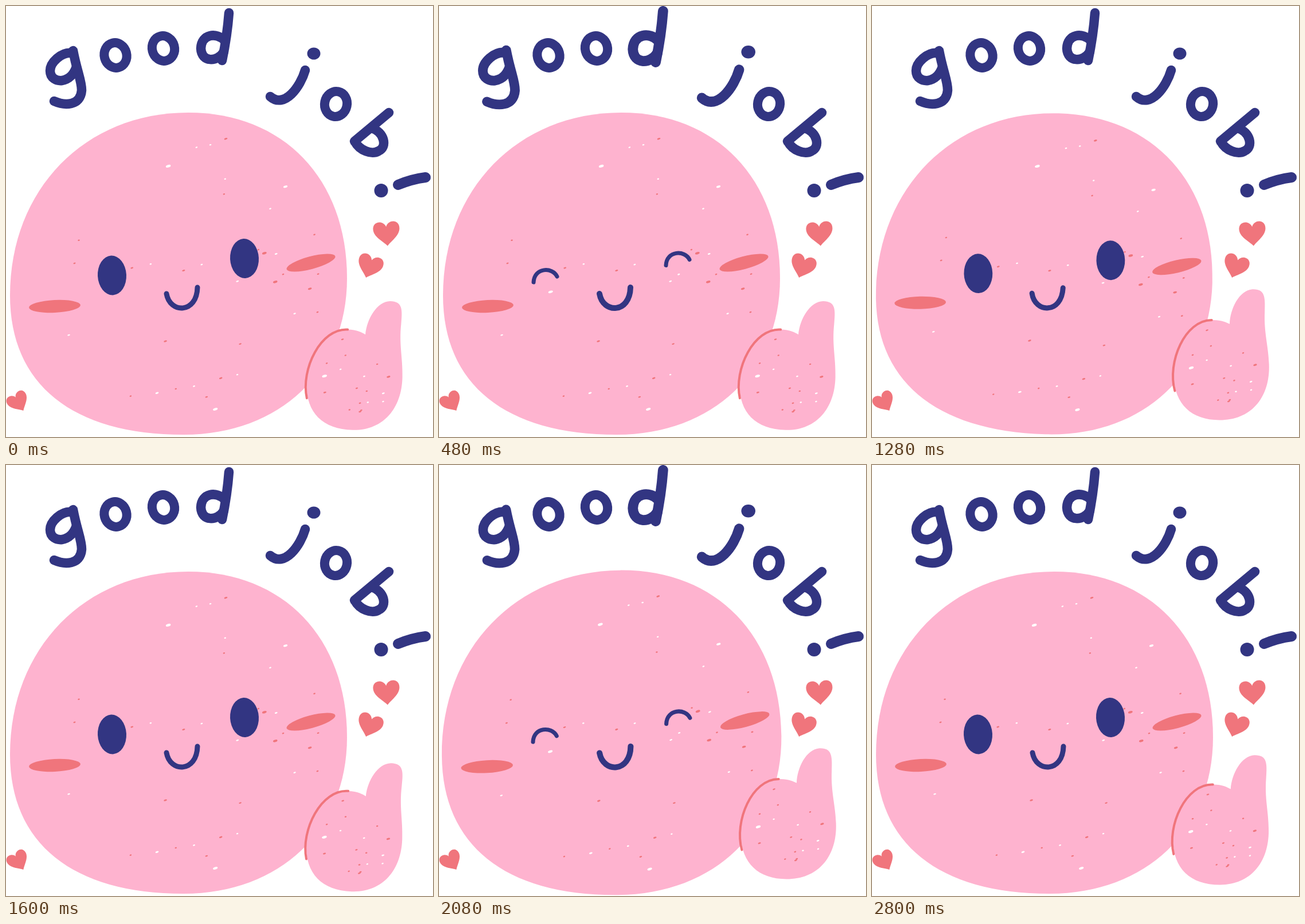
Write an HTML page with a canvas that moves like this. It is 745 px wide and 752 px high and loops after 2880 ms.

```html
<!DOCTYPE html>
<html lang="en">
<head>
<meta charset="utf-8">
<title>good job!</title>
<style>
html, body { margin: 0; width: 100%; height: 100%; overflow: hidden; background: #fff; }
canvas { display: block; }
</style>
</head>
<body>
<canvas id="stage" width="745" height="752"></canvas>
<script>
const ctx = document.getElementById('stage').getContext('2d');
const PINK = '#feb3cf', NAVY = '#323582', CORAL = '#f0757c', WHITE = '#fff';
const STEP = 80, STEPS = 36, HALF = 18;
const TAU = Math.PI * 2;

// Smooth hump: 1 at the peak, 0 from the given reach outwards.
const hump = (t, peak, reach) =>
  Math.abs(t - peak) < reach ? Math.cos((t - peak) / reach * Math.PI / 2) ** 2 : 0;

function fill(path, color) {
  ctx.fillStyle = color;
  ctx.fill(new Path2D(path));
}

function brush(path, color, width) {
  ctx.strokeStyle = color;
  ctx.lineWidth = width;
  ctx.stroke(new Path2D(path));
}

function oval(x, y, rx, ry, angle, color) {
  ctx.beginPath();
  ctx.ellipse(x, y, rx, ry, angle, 0, TAU);
  ctx.fillStyle = color;
  ctx.fill();
}

function around(x, y, angle, scale, draw) {
  ctx.save();
  ctx.translate(x, y);
  ctx.rotate(angle);
  ctx.scale(scale, scale);
  ctx.translate(-x, -y);
  draw();
  ctx.restore();
}

function seeded(seed) {
  return () => (seed = seed * 16807 % 2147483647) / 2147483647;
}

function specks(seed, count, color, x, y, rx, ry) {
  const random = seeded(seed);
  for (let i = 0; i < count; i++) {
    const angle = random() * TAU, reach = Math.sqrt(random()), size = 1.8 + 3 * random() ** 3;
    oval(x + rx * reach * Math.cos(angle), y + ry * reach * Math.sin(angle),
      size, Math.max(1.2, size / 2), -.3, color);
  }
}

function heart(x, y, size, angle) {
  ctx.save();
  ctx.translate(x, y);
  ctx.rotate(angle);
  ctx.scale(size, size);
  ctx.beginPath();
  for (const side of [-1, 1]) {
    ctx.moveTo(0, -.45);
    ctx.bezierCurveTo(side * .2, -1, side * 1.05, -.95, side, -.25);
    ctx.bezierCurveTo(side * .95, .3, side * .3, .65, 0, 1);
  }
  ctx.fillStyle = CORAL;
  ctx.fill();
  ctx.restore();
}

const ink = path => brush(path, NAVY, 16.5);

function letterO(x, y, angle) {
  ctx.beginPath();
  ctx.ellipse(x, y, 19.5, 22, angle, 0, TAU);
  ctx.strokeStyle = NAVY;
  ctx.lineWidth = 16;
  ctx.stroke();
}

function lettering(phase) {
  const swell = (peak, amount) => 1 + amount * hump(phase, peak, 3);
  around(105, 124, 0, swell(6, .02), () => {
    ink('M115,82 C96,80 77,99 77,113 C77,126 88,131 98,130 C113,127 119,117 123,106');
    ink('M117,78 C124,115 132,130 132,147 C130,175 102,174 84,166');
  });
  letterO(191, 86, -.25);
  letterO(274.5, 74, -.25);
  around(364, 54, 0, swell(7, .1), () => {
    ink('M381,60 C368,46 341,48 340,74 C341,99 369,98 380,80');
    ink('M389,12 Q386,52 377,95');
  });
  around(497, 124, 0, swell(7, .09), () => {
    ink('M522,112 C514,140 486,180 461,158');
    oval(537, 83, 11.5, 10.5, 0, NAVY);
  });
  letterO(575.5, 171, .2);
  ink('M668,186 L608,236');
  ink('M638,213 C660,220 666,246 650,253 C638,260 617,252 609,237');
  around(697, 310, 0, swell(11, .08), () => {
    brush('M684,312 Q708,302 732,299', NAVY, 18);
    oval(654.5, 322, 12, 12, 0, NAVY);
  });
}

// Four extreme points joined by quarter curves, each with its own fullness.
function faceShape() {
  const [top, right, bottom, left] = [[318, 186], [595, 475], [310, 748], [7, 505]];
  const quarter = (from, to, corner, full) => {
    const toward = p => p.map((v, i) => v + (corner[i] - v) * full);
    ctx.bezierCurveTo(...toward(from), ...toward(to), ...to);
  };
  ctx.beginPath();
  ctx.moveTo(...top);
  quarter(top, right, [right[0], top[1]], .6);
  quarter(right, bottom, [right[0], bottom[1]], .59);
  quarter(bottom, left, [left[0], bottom[1]], .64);
  quarter(left, top, [left[0], top[1]], .58);
  ctx.fillStyle = PINK;
  ctx.fill();
}

function face(smiling) {
  faceShape();
  specks(11, 20, CORAL, 303, 468, 270, 255);
  specks(47, 19, WHITE, 303, 468, 270, 255);
  oval(85, 524, 45, 11, -.05, CORAL);
  oval(532, 448, 44, 11, -.26, CORAL);
  for (const [x, y] of [[185, 470], [416, 440.5]]) {
    if (smiling) brush(`M${x - 20},${y + 12} c1,-26 33,-27 41,-10`, NAVY, 7);
    else oval(x, y, 25, 34.5, -.05, NAVY);
  }
  brush('M280,502 C286,537 333,537 334,491', NAVY, smiling ? 10 : 9);
}

function hand() {
  fill(`M595,559 C612,559 620,564 626,567 C628,540 645,509 668,508 C690,508 690,522 688,548
    C685,585 692,605 692,640 C692,695 660,734 607,734 C555,734 525,705 525,655
    C525,610 552,559 595,559 Z`, PINK);
  specks(5, 12, CORAL, 615, 640, 65, 75);
  specks(23, 6, WHITE, 615, 640, 65, 75);
  brush('M595,559 C548,557 514,630 526,680', CORAL, 4);
}

function render(k) {
  const phase = k % HALF;
  const turn = hump(k, 16, 4), bounce = hump(k, 26, 5);
  ctx.fillStyle = WHITE;
  ctx.fillRect(0, 0, 745, 752);
  ctx.lineCap = ctx.lineJoin = 'round';

  lettering(phase);
  around(303, 468, .028 * turn - .008 * bounce, 1 - .003 * turn + .008 * bounce,
    () => face(phase >= 4 && phase <= 8));
  heart(664, 395.5, 23, -.08);
  heart(635, 453, 22, .32);
  heart(21, 690, 18.5, -.53);

  // The thumb lingers at both ends of its swing.
  const lift = -6.5 + 18.5 * Math.tanh(1.6 * Math.sin(TAU * (phase + 1.5) / HALF));
  ctx.save();
  ctx.translate(0, lift);
  around(608, 620, lift * .0033, 1, hand);
  ctx.restore();
}

const start = performance.now();
function tick() {
  render(Math.floor((performance.now() - start) / STEP) % STEPS);
  requestAnimationFrame(tick);
}
tick();
</script>
</body>
</html>
```
